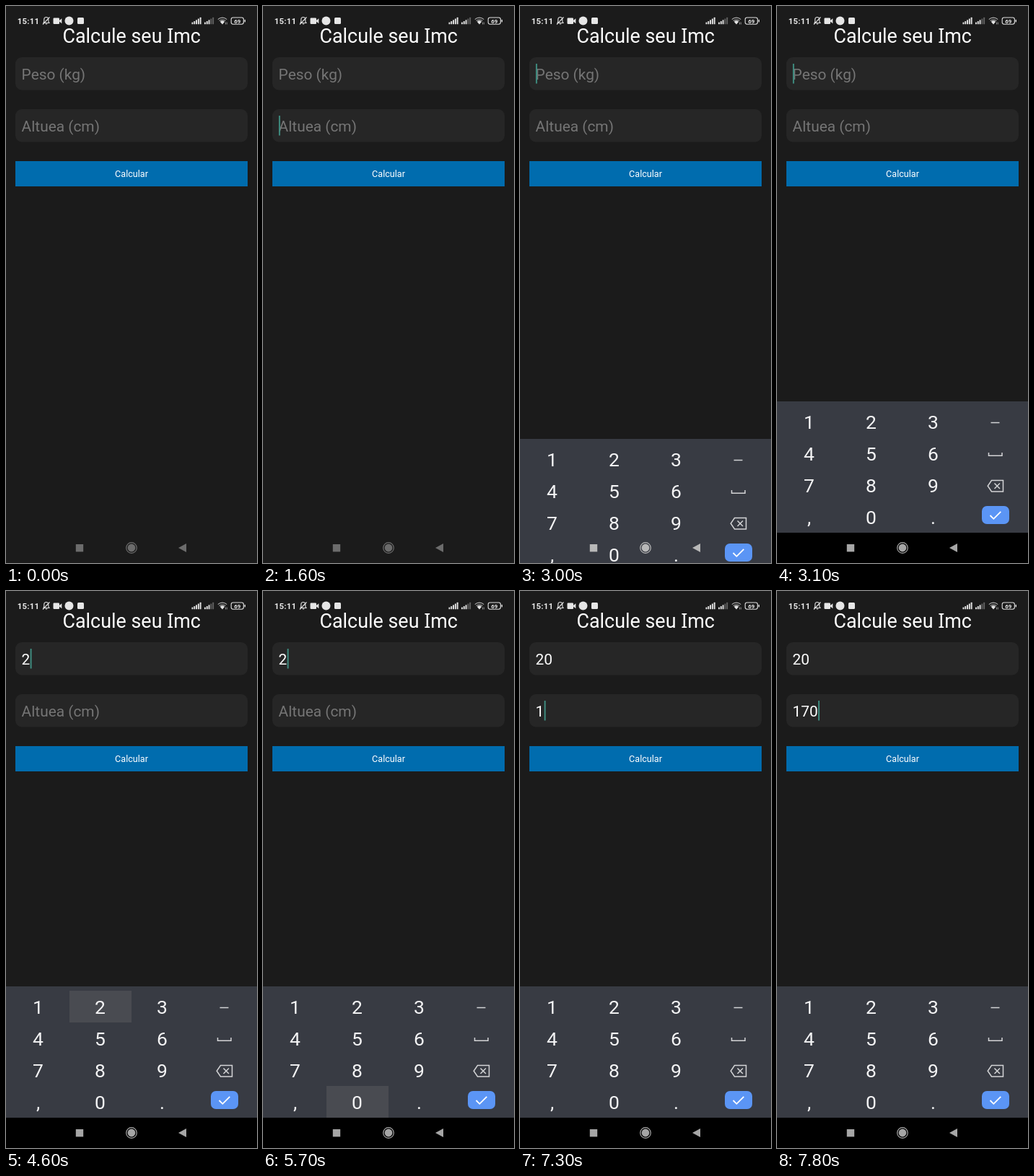
Recreate the animation shown at these times as an HTML page. Size 348 by 772 pixels, loop 8 s.

```html
<!DOCTYPE html>
<html lang="pt">
<head>
<meta charset="utf-8">
<title>Calcule seu Imc</title>
<style>
  html, body { margin: 0; width: 100%; height: 100%; overflow: hidden; background: #1b1b1b; }
  svg { display: block; width: 348px; height: 772px; }
  text { font-family: Roboto, sans-serif; fill: #fff; }
  .title { font-size: 26.9px; text-anchor: middle; }
  .title tspan { font-family: "Noto Sans", sans-serif; }
  .field { fill: #262626; }
  .value { font-size: 20.9px; }
  .caret { fill: #3f8f82; }
  .empty { fill: #757575; }
  .button { font-size: 12.6px; text-anchor: middle; }
  .key { font-size: 26.5px; text-anchor: middle; fill: #f4f4f5; }
  .line { fill: none; stroke: #d3d4d6; stroke-width: 1.5; }
  .status { fill: #e6e6e6; }
  .thin { fill: none; stroke: #e0e0e0; stroke-width: 1.1; }
</style>
</head>
<body>
<svg viewBox="0 0 348 772">
  <rect width="348" height="772" fill="#1b1b1b"/>

  <g class="status">
    <text class="status" x="15.8" y="24.9" font-size="11.4" font-weight="600" letter-spacing=".2">15:11</text>
    <path class="thin" d="M52 23.5h8l-1.2-2v-3a3 3 0 0 0-6 0v3zM54.8 25h2.4M51 25.5l9.5-10"/>
    <rect x="65.5" y="16.5" width="8.5" height="8.5" rx="1.2"/>
    <path d="M74 20l3.3-2.8v7L74 21.6z"/>
    <circle cx="87.5" cy="20.5" r="6"/>
    <rect x="99" y="16" width="9" height="9" rx="1.5"/>
    <g id="bars"></g>
    <path d="M300 25.5l-3.2-3.8a5 5 0 0 1 6.4 0z"/>
    <path class="thin" d="M293.8 18.6a9 9 0 0 1 12.4 0M295.6 20.7a6.4 6.4 0 0 1 8.8 0" opacity=".75"/>
    <path d="M304.5 22.5v3M306.3 22.5v3" stroke="#aaa" stroke-width=".8"/>
    <rect class="thin" x="312.2" y="16" width="17.2" height="9.2" rx="2.6"/>
    <rect x="330.6" y="18.8" width="1.4" height="3.6" rx=".7"/>
    <text class="status" x="320.8" y="23.6" font-size="8" font-weight="600" text-anchor="middle">69</text>
  </g>

  <text class="title" x="174.2" y="50.6">Calcule seu <tspan>I</tspan>mc</text>
  <rect class="field" x="13" y="71" width="322" height="45.5" rx="9"/>
  <rect class="field" x="13" y="143" width="322" height="45.5" rx="9"/>
  <text class="value" id="weight" x="21.6" y="102"></text>
  <text class="value" id="height" x="21.6" y="174"></text>
  <rect class="caret" id="caret" width="1.9" height="27.5"/>
  <rect x="13" y="215" width="322" height="35" fill="#006cae"/>
  <text class="button" x="174" y="237.4">Calcular</text>

  <g id="keyboard">
    <rect y="548" width="348" height="224" fill="#383b43"/>
    <rect y="730" width="348" height="42"/>
    <rect id="press" width="86" height="44" fill="#494b51"/>
    <g id="keys"></g>
    <path class="line" d="M296.5 577.5h12" stroke-width="2"/>
    <path class="line" d="M293.5 619v4.2h18.5V619"/>
    <path class="line" d="M297.5 657.5h16v15.5h-16l-5.3-7.75zM301.5 661.5l7.5 7.5M309 661.5l-7.5 7.5"/>
    <rect x="284" y="693" width="38" height="25" rx="7" fill="#5b95f5"/>
    <path d="M295.5 706l4.8 4.8 10-10" fill="none" stroke="#fff" stroke-width="1.8"/>
  </g>

  <g id="nav">
    <rect x="96.8" y="746" width="10.4" height="10.4"/>
    <circle cx="174" cy="751" r="5.4"/>
    <circle cx="174" cy="751" r="7.3" style="fill:none;stroke:currentColor;stroke-width:1.2"/>
    <path d="M239 751l11-6v12z"/>
  </g>
</svg>
<script>
const $ = id => document.getElementById(id);
const LOOP = 8000, DIGIT = 11.74;

// x, baseline and label of each key
const labels = "123456789,0.";
$("keys").innerHTML = [...labels].map((c, i) =>
  `<text class="key" x="${44.5 + 86 * (i % 3)}" y="${586.4 + 44 * Math.floor(i / 3)}">${c}</text>`).join("");

$("bars").innerHTML = [257.5, 275].map((x, s) => [0, 1, 2, 3, 4].map(i =>
  `<rect x="${x + i * 2.8}" y="${22.6 - i * 1.7}" width="1.9" height="${2.6 + i * 1.7}" rx=".5" opacity="${s && i > 2 ? .35 : 1}"/>`
).join("")).join("");

// Each track lists [start, value]; a value holds until the next one
const tracks = {
  weight: [[0, ""], [4600, "2"], [5800, "20"]],
  height: [[0, ""], [7200, "1"], [7500, "17"], [7800, "170"]],
  focus: [[0, "height"], [2500, "weight"], [6500, "height"]],
  caret: [[0, 0], [600, 1], [1100, 0], [1600, 1], [2100, 0], [2500, 1], [3200, 0], [3700, 1],
    [4200, 0], [4600, 1], [5100, 0], [5700, 1], [6400, 0], [6500, 1], [7000, 0], [7200, 1]],
  press: [[0, ""], [4600, "2"], [4700, ""], [5700, "0"], [5900, ""],
    [7200, "1"], [7300, ""], [7500, "7"], [7700, ""]],
  drop: [[0, 224], [2900, 209], [3000, 52], [3100, 0]],
  nav: [[0, "#6c6c6c"], [2800, "#b8b8b8"], [3100, "#a6a6a6"]]
};
const at = (name, t) => tracks[name].filter(([start]) => start <= t).pop()[1];

function setField(id, value, hint) {
  $(id).textContent = value || hint;
  $(id).classList.toggle("empty", !value);
}

function draw(t) {
  const text = { weight: at("weight", t), height: at("height", t) };
  setField("weight", text.weight, "Peso (kg)");
  setField("height", text.height, "Altuea (cm)");

  const focus = at("focus", t);
  $("caret").setAttribute("x", 21.9 + DIGIT * text[focus].length);
  $("caret").setAttribute("y", focus === "weight" ? 80 : 152);
  $("caret").style.opacity = at("caret", t);

  const key = at("press", t), i = labels.indexOf(key);
  $("press").style.opacity = key ? 1 : 0;
  $("press").setAttribute("x", 2 + 86 * (i % 3));
  $("press").setAttribute("y", 554 + 44 * Math.floor(i / 3));

  $("keyboard").setAttribute("transform", `translate(0 ${at("drop", t)})`);
  $("nav").style.fill = $("nav").style.color = at("nav", t);
}

function tick() {
  draw(performance.now() % LOOP);
  requestAnimationFrame(tick);
}
tick();
</script>
</body>
</html>
```
